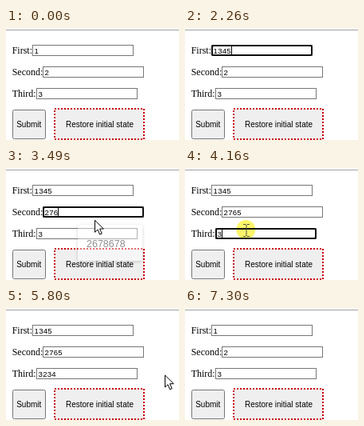
These frames come from a looping animation (217x140 px, 8840 ms). An HTML page:

```html
<!DOCTYPE html>
<html lang="en">
<head>
<meta charset="utf-8">
<title>Form reset</title>
<style>
html, body { margin: 0; width: 100%; height: 100%; overflow: hidden; background: #fff; }
svg { display: block; width: 100vw; height: 100vh; }
text { font: 10px "Liberation Sans", Arial, sans-serif; white-space: pre; }
.label { font: 12px "Liberation Serif", "Times New Roman", serif; }
.value { font-size: 9.6px; letter-spacing: .2px; }
#popup { filter: drop-shadow(0 1px 2px rgba(0, 0, 0, .4)); }
#popup text { font-size: 12.5px; }
#halo { mix-blend-mode: multiply; }
</style>
</head>
<body>
<svg viewBox="0 0 217 140">
  <rect y="2" width="217" height="1" fill="#a0a0a0"/>
  <g id="fields"></g>
  <rect x="8.5" y="102.5" width="41" height="36" rx="2" fill="#efefef" stroke="#767676"/>
  <text x="13.2" y="124">Submit</text>
  <rect id="restore" x="61" y="101" width="112" height="38" stroke="#c8000c" stroke-width="2" stroke-dasharray="2"/>
  <text x="75" y="124">Restore initial state</text>
  <rect id="caret" width="1" height="10"/>
  <g id="popup">
    <rect x="90" y="71" width="81" height="45" rx="2" fill="#fff"/>
    <text x="101" y="99">2678678</text>
  </g>
  <circle id="halo" cx="-.7" cy="-1" r="12" fill="#fbf56a"/>
  <path id="arrow" d="M.5 .5V15.5L4 12.2L6.6 18.3L9.2 17.2L6.6 11.2H11.3Z" fill="#fff" stroke="#000"/>
  <path id="beam" d="M-4 -7.5H-1L0 -6.5L1 -7.5H4M0 -6.5V6.5M-4 7.5H-1L0 6.5L1 7.5H4" fill="none" stroke="#444" stroke-width=".9"/>
</svg>
<script>
const LOOP = 8840, BLINK = 490, DIGIT = 5.54;
const $ = id => document.getElementById(id);

// One click per field, one beside the form, one on the restore button
const clicks = [1030, 2860, 4160, 5350, 6590];
const reset = clicks[4];

// Typing begins at `from` with one key every `step` ms
const rows = [
  { label: "First:", x: 33, text: "1345", from: 2010, step: 125 },
  { label: "Second:", x: 46, text: "2765", from: 3260, step: 140 },
  { label: "Third:", x: 38, text: "3234", from: 4470, step: 195 },
];
rows.forEach((r, i) => r.y = 21 + 27 * i);

// Pointer moves: start, duration, goal and downward bow
const home = { x: 222, y: 66 };
const moves = [
  { at: 420, ms: 560, x: 92, y: 26 },
  { at: 1060, ms: 160, ...home },
  { at: 2570, ms: 270, x: 118, y: 56 },
  { at: 3300, ms: 730, x: 77, y: 78, bow: 10 },
  { at: 4470, ms: 550, x: 202, y: 81, bow: 38 },
  { at: 5740, ms: 60, x: 199, y: 83.5 },
  { at: 6010, ms: 300, x: 118, y: 118 },
  { at: 7200, ms: 100, x: 118, y: 142 },
];

$("fields").innerHTML = rows.map(({ label, x, y }) => `
  <text class="label" x="7.7" y="${y + 11}">${label}</text>
  <rect x="${x + .5}" y="${y + .5}" width="126" height="13" fill="#fff" stroke="#767676"/>
  <rect class="ring" x="${x + 1}" y="${y + 1}" width="125" height="12" rx="2" fill="none" stroke="#101010" stroke-width="2"/>
  <text class="value" x="${x + 2.6}" y="${y + 11}"></text>`).join("");
const rings = document.querySelectorAll(".ring");
const values = document.querySelectorAll(".value");

const clamp = v => Math.max(0, Math.min(1, v));
const inside = (p, x, y, w, h) => p.x >= x && p.x < x + w && p.y >= y && p.y < y + h;
const show = (el, on) => el.setAttribute("visibility", on ? "visible" : "hidden");

function pointerAt(t) {
  let p = home;
  for (const { at, ms, x, y, bow = 0 } of moves) {
    const k = clamp((t - at) / ms), e = k * k * (3 - 2 * k);
    p = { x: p.x + (x - p.x) * e, y: p.y + (y - p.y) * e + bow * Math.sin(Math.PI * e) };
  }
  return p;
}

function drawField(r, i, t) {
  const typed = t < reset ? Math.max(0, Math.min(3, Math.floor((t - r.from) / r.step) + 1)) : 0;
  const focused = t >= clicks[i] && t < clicks[i + 1];
  values[i].textContent = r.text.slice(0, typed + 1);
  show(rings[i], focused);
  if (!focused) return;
  const since = t - (typed ? r.from + (typed - 1) * r.step : clicks[i]);
  $("caret").setAttribute("x", Math.round(r.x + 2.4 + DIGIT * (typed + 1)));
  $("caret").setAttribute("y", r.y + 2);
  show($("caret"), since % (2 * BLINK) < BLINK);
}

function draw(t) {
  show($("caret"), false);
  rows.forEach((r, i) => drawField(r, i, t));
  $("popup").setAttribute("opacity", Math.min(clamp((t - 2900) / 160), clamp((3630 - t) / 320)));

  const p = pointerAt(t);
  for (const id of ["arrow", "beam", "halo"]) $(id).setAttribute("transform", `translate(${p.x} ${p.y})`);
  const overField = rows.some(r => inside(p, r.x, r.y, 127, 14));
  show($("arrow"), !overField);
  show($("beam"), overField);

  show($("halo"), clicks.some(c => t >= c && t < c + 80));
  $("restore").setAttribute("fill", inside(p, 60, 100, 114, 40) ? "#e5e5e5" : "#efefef");
}

const begin = performance.now();
function tick() {
  draw((performance.now() - begin) % LOOP);
  requestAnimationFrame(tick);
}
tick();
</script>
</body>
</html>
```
